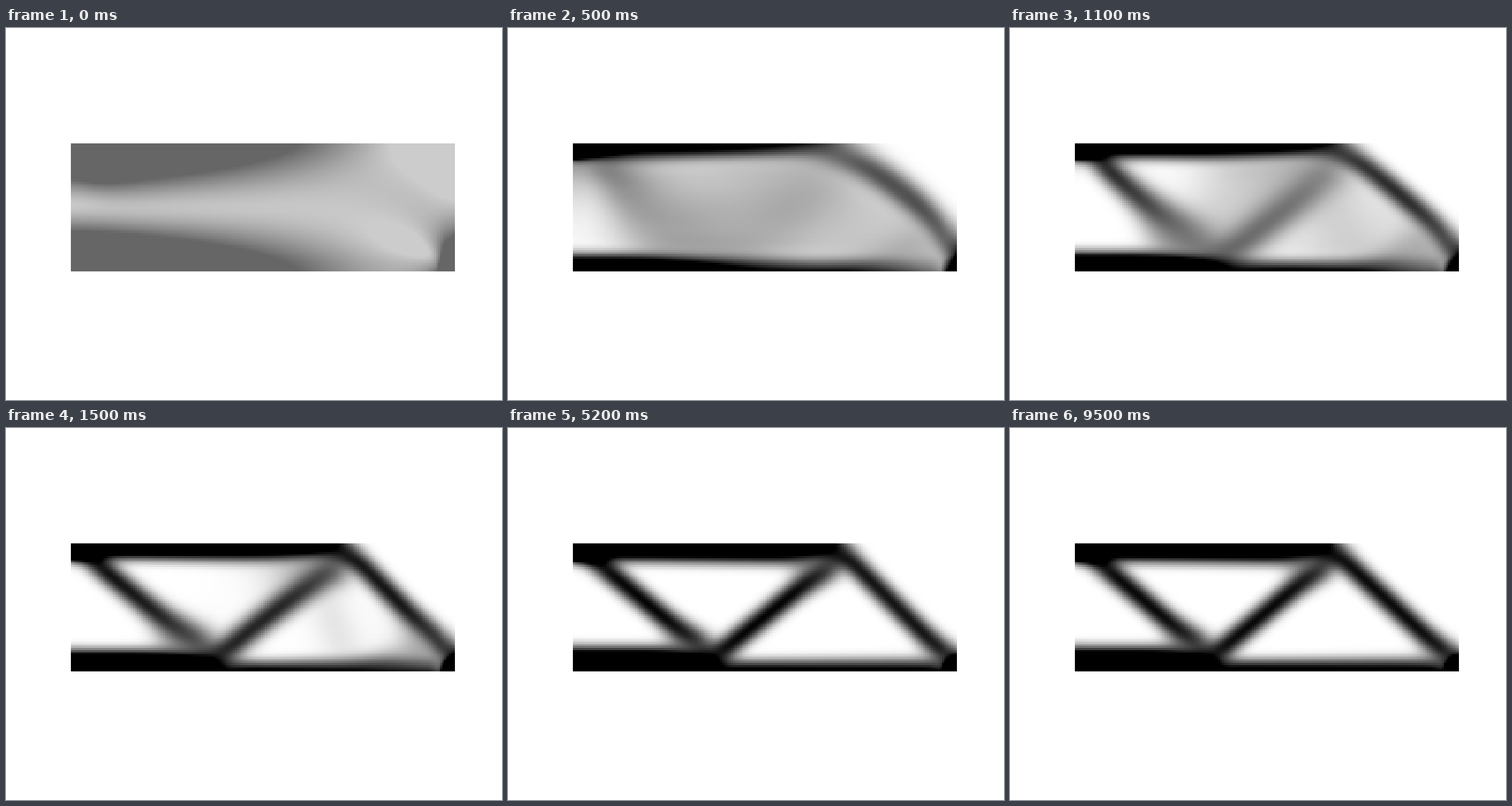
Animation, 864 px wide and 648 px high, one loop 9.9 s. Source, as an HTML page with a canvas:

```html
<!DOCTYPE html>
<html lang="en">
<head>
<meta charset="utf-8">
<title>Beam topology optimization</title>
<style>
  html, body { margin: 0; width: 100%; height: 100%; overflow: hidden; background: #fff; }
  canvas { position: absolute; left: 113px; top: 201px; width: 669px; height: 223px; image-rendering: pixelated; }
</style>
</head>
<body>
<canvas id="view" width="180" height="60"></canvas>
<script>
// Half MBB beam: SIMP with sensitivity filter and optimality criteria.
const NX = 180, NY = 60, H = NY + 1;
const VOLUME = 0.4, RADIUS = 7.2, MOVE = 0.2, NU = 0.3, EMIN = 1e-9;
const STEPS = 99, STEP_MS = 100, CG_STEPS = 10, OMEGA = 0.6;
const C = 1 / (1 - NU * NU), SHEAR = (1 - NU) / 2, HOUR = 0.5 - NU / 6;
const CELLS = NX * NY, DOFS = 2 * (NX + 1) * H;
const vec = n => new Float64Array(n);

const x = vec(CELLS).fill(VOLUME), E = vec(CELLS);
const u = vec(DOFS), r = vec(DOFS), z = vec(DOFS), p = vec(DOFS), q = vec(DOFS), diag = vec(DOFS);

// Left edge slides vertically, the bottom right corner rests on a roller.
function pin(a) {
  for (let i = 0; i < H; i++) a[2 * i] = 0;
  a[DOFS - 1] = 0;
}

// y = K u from the strain and hourglass modes of each square cell.
function apply(u, y, energy) {
  y.fill(0);
  for (let ex = 0, e = 0; ex < NX; ex++) {
    for (let ey = 0; ey < NY; ey++, e++) {
      const a = 2 * (ex * H + ey), b = a + 2 * H;
      const u1 = u[a], u2 = u[b], u3 = u[b + 2], u4 = u[a + 2];
      const v1 = u[a + 1], v2 = u[b + 1], v3 = u[b + 3], v4 = u[a + 3];
      const ux = (u2 + u3 - u1 - u4) / 2, vy = (v3 + v4 - v1 - v2) / 2;
      const g = (u3 + u4 - u1 - u2 + v2 + v3 - v1 - v4) / 2;
      const uh = (u1 + u3 - u2 - u4) / 2, vh = (v1 + v3 - v2 - v4) / 2;
      const k = E[e] * C / 2;
      const sx = k * (ux + NU * vy), sy = k * (vy + NU * ux), t = k * SHEAR * g;
      const hu = k * HOUR * uh, hv = k * HOUR * vh;
      y[a] += hu - sx - t;
      y[b] += sx - t - hu;
      y[b + 2] += sx + t + hu;
      y[a + 2] += t - sx - hu;
      y[a + 1] += hv - t - sy;
      y[b + 1] += t - sy - hv;
      y[b + 3] += t + sy + hv;
      y[a + 3] += sy - t - hv;
      if (energy) energy[e] = 2 * (sx * ux + sy * vy + t * g + hu * uh + hv * vh) / E[e];
    }
  }
  pin(y);
}

// Coarse grid of 2 x 2 cells, solved directly with a banded Cholesky factor.
const CX = NX / 2, CY = NY / 2, CH = CY + 1, CN = 2 * (CX + 1) * CH;
const BAND = 2 * CH + 3, W = BAND + 1;
const L = vec(CN * W), cb = vec(CN);
const corners = h => [0, 1, 2, 3, 2 * h, 2 * h + 1, 2 * h + 2, 2 * h + 3];
const coarseDofs = corners(CH);

function cellMatrix() {
  const base = 2 * H, ids = corners(H).map(d => d + base), ke = [];
  E.fill(0);
  E[NY] = 1;
  for (const id of ids) {
    p.fill(0);
    p[id] = 1;
    apply(p, q);
    ke.push(ids.map(d => q[d]));
  }
  return ke;
}

// Stiffness that quarter s adds to its coarse cell.
function quarterMatrix(ke, s) {
  const m = vec(64);
  const weight = (n, c) => {
    const px = ((s >> 1) + (n >> 1)) / 2, py = ((s & 1) + (n & 1)) / 2;
    return (c >> 1 ? px : 1 - px) * (c & 1 ? py : 1 - py);
  };
  for (let i = 0; i < 8; i++)
    for (let j = 0; j < 8; j++)
      for (let a = 0; a < 4; a++)
        for (let b = 0; b < 4; b++)
          m[8 * i + j] += weight(a, i >> 1) * weight(b, j >> 1) * ke[2 * a + (i & 1)][2 * b + (j & 1)];
  return m;
}
const ke = cellMatrix();
const [Q0, Q1, Q2, Q3] = [0, 1, 2, 3].map(s => quarterMatrix(ke, s));

function factor() {
  L.fill(0);
  for (let ex = 0; ex < CX; ex++) {
    for (let ey = 0; ey < CY; ey++) {
      const e = 2 * ex * NY + 2 * ey, base = 2 * (ex * CH + ey);
      const e0 = E[e], e1 = E[e + 1], e2 = E[e + NY], e3 = E[e + NY + 1];
      for (let i = 0; i < 8; i++) {
        for (let j = 0; j <= i; j++) {
          const k = 8 * i + j, at = (base + coarseDofs[i]) * W + BAND + coarseDofs[j] - coarseDofs[i];
          L[at] += e0 * Q0[k] + e1 * Q1[k] + e2 * Q2[k] + e3 * Q3[k];
        }
      }
    }
  }
  for (let i = 0; i < CH; i++) L[2 * i * W + BAND] += 1e9;
  L[(CN - 1) * W + BAND] += 1e9;
  for (let i = 0; i < CN; i++) {
    const lo = Math.max(0, i - BAND), ri = i * W + BAND - i;
    for (let j = lo; j <= i; j++) {
      const rj = j * W + BAND - j;
      let s = L[ri + j];
      for (let k = lo; k < j; k++) s -= L[ri + k] * L[rj + k];
      L[ri + j] = j < i ? s / L[rj + j] : Math.sqrt(s);
    }
  }
}

function solveCoarse() {
  for (let i = 0; i < CN; i++) {
    const ri = i * W + BAND - i;
    let s = cb[i];
    for (let k = Math.max(0, i - BAND); k < i; k++) s -= L[ri + k] * cb[k];
    cb[i] = s / L[ri + i];
  }
  for (let i = CN - 1; i >= 0; i--) {
    const ri = i * W + BAND - i, s = cb[i] / L[ri + i];
    cb[i] = s;
    for (let k = Math.max(0, i - BAND); k < i; k++) cb[k] -= L[ri + k] * s;
  }
}

// Bilinear interpolation up to the fine grid, or its transpose down.
function transfer(fine, up) {
  for (let ix = 0, f = 0; ix <= NX; ix++) {
    const left = (ix >> 1) * CH, right = ((ix + 1) >> 1) * CH;
    for (let iy = 0; iy < H; iy++) {
      const top = iy >> 1, low = (iy + 1) >> 1;
      for (let c = 0; c < 2; c++, f++) {
        const a = 2 * (left + top) + c, b = 2 * (left + low) + c;
        const d = 2 * (right + top) + c, g = 2 * (right + low) + c;
        if (up) {
          fine[f] += (cb[a] + cb[b] + cb[d] + cb[g]) / 4;
        } else {
          const part = fine[f] / 4;
          cb[a] += part;
          cb[b] += part;
          cb[d] += part;
          cb[g] += part;
        }
      }
    }
  }
}

function precondition() {
  for (let i = 0; i < DOFS; i++) z[i] = OMEGA * r[i] / diag[i];
  apply(z, q);
  for (let i = 0; i < DOFS; i++) q[i] = r[i] - q[i];
  cb.fill(0);
  transfer(q, false);
  solveCoarse();
  transfer(z, true);
  pin(z);
  apply(z, q);
  for (let i = 0; i < DOFS; i++) z[i] += OMEGA * (r[i] - q[i]) / diag[i];
}

function dot(a, b) {
  let s = 0;
  for (let i = 0; i < DOFS; i++) s += a[i] * b[i];
  return s;
}

// Two-grid conjugate gradients, warm started from the last displacement.
function solve() {
  apply(u, q);
  for (let i = 0; i < DOFS; i++) r[i] = -q[i];
  r[1] += 1;
  precondition();
  p.set(z);
  let rz = dot(r, z);
  for (let n = 0; n < CG_STEPS && rz > 1e-24; n++) {
    apply(p, q);
    const alpha = rz / dot(p, q);
    for (let i = 0; i < DOFS; i++) {
      u[i] += alpha * p[i];
      r[i] -= alpha * q[i];
    }
    precondition();
    const next = dot(r, z), beta = next / rz;
    for (let i = 0; i < DOFS; i++) p[i] = z[i] + beta * p[i];
    rz = next;
  }
}

// Sum of neighbours with cone weights.
function blur(src, dst) {
  const reach = Math.floor(RADIUS);
  dst.fill(0);
  for (let dx = -reach; dx <= reach; dx++) {
    for (let dy = -reach; dy <= reach; dy++) {
      const w = RADIUS - Math.hypot(dx, dy);
      if (w <= 0) continue;
      const x1 = Math.min(NX, NX - dx), y0 = Math.max(0, -dy), y1 = Math.min(NY, NY - dy);
      for (let ex = Math.max(0, -dx); ex < x1; ex++)
        for (let e = ex * NY + y0, end = ex * NY + y1, d = dx * NY + dy; e < end; e++)
          dst[e] += w * src[e + d];
    }
  }
}

const energy = vec(CELLS), sens = vec(CELLS), next = vec(CELLS), norm = vec(CELLS);
blur(vec(CELLS).fill(1), norm);

function updateDensity() {
  for (let e = 0; e < CELLS; e++) energy[e] *= 3 * x[e] ** 3;
  blur(energy, sens);
  for (let e = 0; e < CELLS; e++)
    sens[e] = x[e] * Math.sqrt(Math.max(0, sens[e]) / norm[e] / Math.max(1e-3, x[e]));
  let lo = 0, hi = 1e9;
  while ((hi - lo) / (hi + lo) > 1e-3) {
    const mid = (lo + hi) / 2, scale = 1 / Math.sqrt(mid);
    let sum = 0;
    for (let e = 0; e < CELLS; e++) {
      const low = Math.max(0, x[e] - MOVE), high = Math.min(1, x[e] + MOVE);
      sum += next[e] = Math.max(low, Math.min(high, sens[e] * scale));
    }
    if (sum > VOLUME * CELLS) lo = mid; else hi = mid;
  }
  x.set(next);
}

const designs = [];
function step() {
  diag.fill(0);
  for (let ex = 0, e = 0; ex < NX; ex++) {
    for (let ey = 0; ey < NY; ey++, e++) {
      E[e] = EMIN + x[e] ** 3 * (1 - EMIN);
      const a = 2 * (ex * H + ey), b = a + 2 * H, k = E[e] * C * HOUR;
      for (let i = 0; i < 4; i++) {
        diag[a + i] += k;
        diag[b + i] += k;
      }
    }
  }
  factor();
  solve();
  apply(u, q, energy);
  updateDensity();
  designs.push(Float32Array.from(x));
}

const ctx = document.getElementById("view").getContext("2d");
const image = ctx.createImageData(NX, NY);
let shown = -1;

function draw(n) {
  while (designs.length <= n) step();
  if (n === shown) return;
  shown = n;
  const design = designs[n];
  for (let ex = 0, e = 0; ex < NX; ex++) {
    for (let ey = 0; ey < NY; ey++, e++) {
      const at = 4 * (ey * NX + ex);
      image.data[at] = image.data[at + 1] = image.data[at + 2] = Math.round(255 * (1 - design[e]));
      image.data[at + 3] = 255;
    }
  }
  ctx.putImageData(image, 0, 0);
}

while (designs.length < 10) step();
draw(0);
const start = performance.now();

function tick() {
  const t = (performance.now() - start) % (STEPS * STEP_MS);
  draw(Math.floor(t / STEP_MS));
  // Work ahead early in each interval.
  if (designs.length < STEPS && t % STEP_MS < 50) step();
  requestAnimationFrame(tick);
}
requestAnimationFrame(tick);
</script>
</body>
</html>
```
